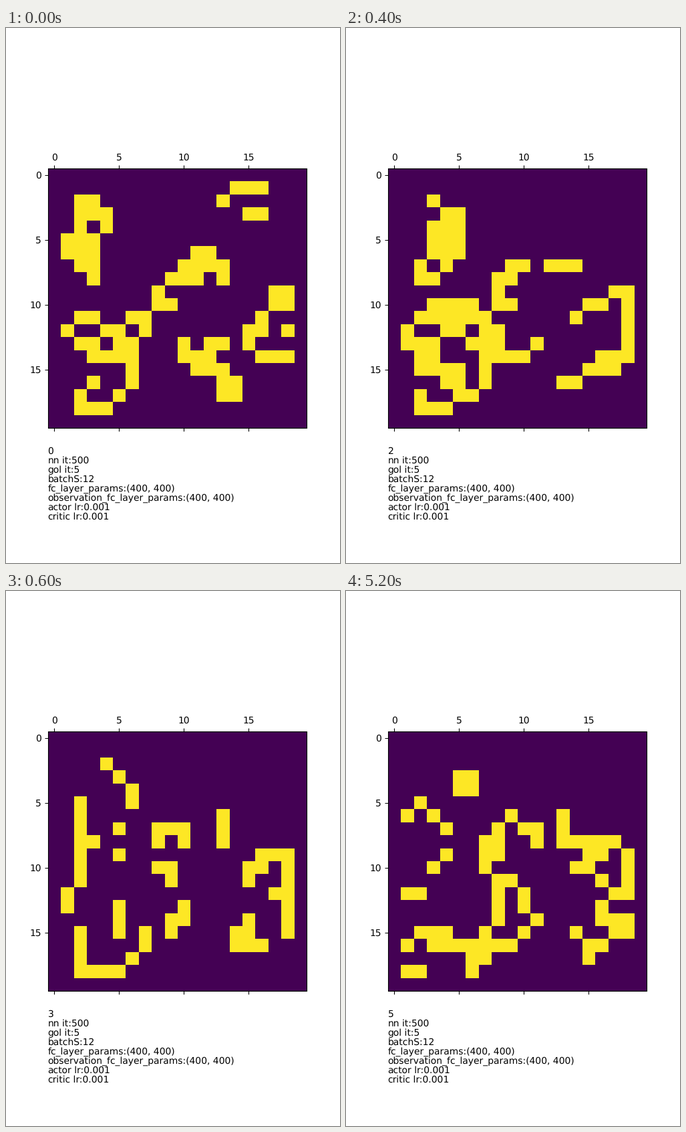
An HTML page with a canvas that plays this animation: 500x800 px, repeating every 8000 ms.

```html
<!DOCTYPE html>
<html lang="en">
<head>
<meta charset="utf-8">
<title>Game of Life plot</title>
<style>
  html, body { margin: 0; width: 100%; height: 100%; overflow: hidden; background: #fff; }
  canvas { display: block; }
</style>
</head>
<body>
<canvas id="stage" width="500" height="800"></canvas>
<script>
const ctx = document.getElementById('stage').getContext('2d');

const SIZE = 20, LEFT = 63, TOP = 210, CELL = 19.4;
const LOOP = 8000, STEP = 200, GENERATIONS = 6;
const FONT_SIZE = 125 / 9, DIGIT_WIDTH = 8.875;

// Blank space in pixels left of a glyph's ink.
const BEARINGS = { 1: 1.58, 5: 1.5 }, DEFAULT_BEARING = 0.9;

// Live columns of rows 1 to 18 in the first generation, as ranges.
const SEED = [
  '14-16', '2-3 13', '2-4 15-16', '2 4', '1-3', '1-3 11-12',
  '2-3 10-13', '3 9-11 13', '8 17-18', '8-9 17-18', '2-3 6-7 16',
  '1 4-5 7 15-16 18', '2-3 5-6 10 12-13 15', '3-6 10-12 16-18',
  '6 11-13', '3 6 13-14', '2 5 13-14', '2-4'
];

const CAPTION = [
  'nn it:500', 'gol it:5', 'batchS:12', 'fc_layer_params:(400, 400)',
  'observation_fc_layer_params:(400, 400)', 'actor lr:0.001', 'critic lr:0.001'
];

const makeGrid = rule => Array.from({ length: SIZE }, (_, row) =>
  Array.from({ length: SIZE }, (_, col) => rule(row, col) ? 1 : 0));

function seedGrid() {
  return makeGrid((row, col) => (SEED[row - 1] || '').split(' ').some(range => {
    const [first, last = first] = range.split('-').map(Number);
    return range && col >= first && col <= last;
  }));
}

// The outermost ring of cells always stays dead.
function nextGrid(grid) {
  const inside = n => n > 0 && n < SIZE - 1;
  return makeGrid((row, col) => {
    if (!inside(row) || !inside(col)) return false;
    let sum = -grid[row][col];
    for (let dy = -1; dy <= 1; dy++)
      for (let dx = -1; dx <= 1; dx++) sum += grid[row + dy][col + dx];
    return sum === 3 || (sum === 2 && grid[row][col]);
  });
}

const generations = [seedGrid()];
while (generations.length < GENERATIONS) generations.push(nextGrid(generations.at(-1)));

const edgeX = col => Math.round(LEFT + col * CELL);
const edgeY = row => Math.round(TOP + row * CELL);

// The ink edge snaps to a whole pixel; glyphs after the first sit one pixel tighter.
function drawText(text, x, y) {
  const first = text[0], bearing = BEARINGS[first] || DEFAULT_BEARING;
  const ink = Math.round(x + bearing);
  ctx.fillText(first, ink - Math.floor(bearing), y);
  ctx.fillText(text.slice(1), ink - Math.ceil(bearing) + ctx.measureText(first).width, y);
}

function drawCells(grid) {
  ctx.fillStyle = '#440154';
  ctx.fillRect(LEFT, TOP, SIZE * CELL, SIZE * CELL);
  ctx.fillStyle = '#fde725';
  grid.forEach((line, row) => line.forEach((alive, col) => {
    const x = edgeX(col), y = edgeY(row);
    if (alive) ctx.fillRect(x, y, edgeX(col + 1) - x, edgeY(row + 1) - y);
  }));
}

function drawAxes() {
  ctx.strokeStyle = ctx.fillStyle = '#000';
  ctx.lineWidth = 1.11;
  ctx.strokeRect(63.5, 210.5, 387, 388);
  ctx.beginPath();
  for (let n = 0; n < SIZE; n += 5) {
    const label = String(n), width = label.length * DIGIT_WIDTH;
    const x = 72.19 + n * 19.375, y = 219.94 + n * 19.375;
    const tickX = Math.round(x) + 0.5, tickY = Math.round(y) + 0.5;
    ctx.moveTo(tickX, 205.5);
    ctx.lineTo(tickX, 210.5);
    ctx.moveTo(tickX, 598.5);
    ctx.lineTo(tickX, 603.5);
    ctx.moveTo(58.5, tickY);
    ctx.lineTo(63.5, tickY);
    drawText(label, x - width / 2, 198);
    drawText(label, 52.78 - width, Math.round(y + 5.4));
  }
  ctx.stroke();
}

function draw(index) {
  ctx.fillStyle = '#fff';
  ctx.fillRect(0, 0, 500, 800);
  ctx.font = `${FONT_SIZE}px "DejaVu Sans", sans-serif`;
  ctx.textRendering = 'geometricPrecision';
  drawCells(generations[index]);
  drawAxes();
  [String(index), ...CAPTION].forEach((text, i) => drawText(text, 62.5, 637 + i * 14));
}

function tick() {
  const time = performance.now() % LOOP;
  draw(Math.min(GENERATIONS - 1, Math.floor(time / STEP)));
  requestAnimationFrame(tick);
}
tick();
</script>
</body>
</html>
```
